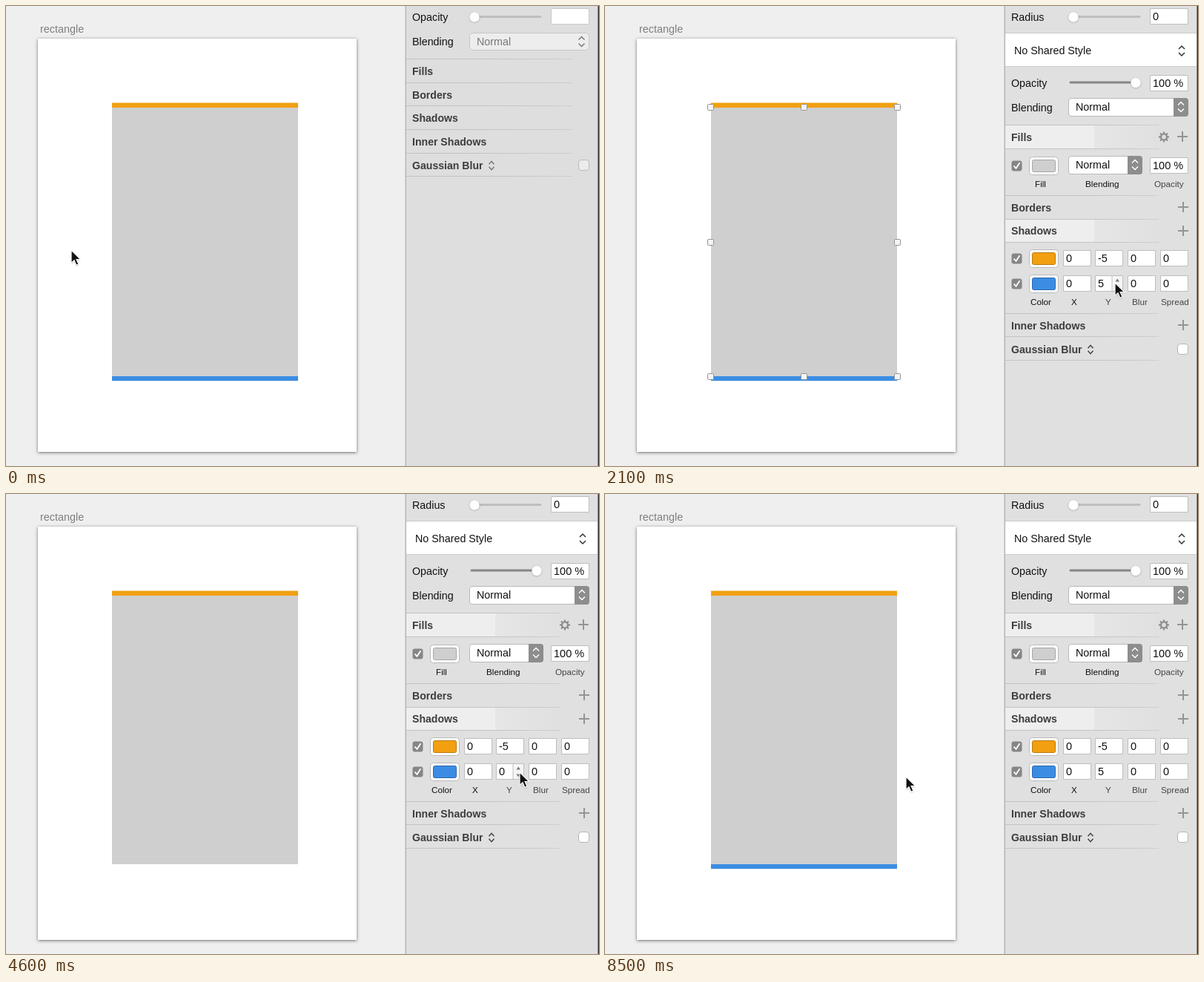
Animation of 800x620 px, one loop 8.6 s. Source, as an HTML page with a canvas:

```html
<!DOCTYPE html>
<html lang="en">
<head>
<meta charset="utf-8">
<title>Shadow inspector</title>
<style>
html, body { margin: 0; width: 100%; height: 100%; overflow: hidden; background: #efefef; }
canvas { display: block; }
</style>
</head>
<body>
<canvas id="stage" width="800" height="620"></canvas>
<script>
const c = document.getElementById('stage').getContext('2d');
const LOOP = 8600, SELECT = 1000;
const ORANGE = '#f2a011', BLUE = '#3b8ce2', GREY = '#cfcfcf';
const REGULAR = '14.3px', BOLD = 'bold 14.1px', SMALL = '11.7px';

// Pointer tip: time, x, y
const path = [
  [0, 88, 329], [100, 88, 329], [900, 287, 308], [1300, 287, 308],
  [2100, 688, 373], [2500, 693, 373], [3200, 693, 373], [4400, 693, 375],
  [5200, 693, 375], [5600, 693, 367], [7800, 693, 367], [8200, 406, 381], [LOOP, 406, 381]
];
const downs = [3200, 3500, 3800, 4000, 4400];
const ups = [5900, 6100, 6300, 6500, 6700];

function pointerAt(t) {
  const i = path.findIndex(k => k[0] > t);
  const [t0, x0, y0] = path[i - 1], [t1, x1, y1] = path[i];
  const u = (t - t0) / (t1 - t0), e = u * u * (3 - 2 * u);
  return [x0 + (x1 - x0) * e, y0 + (y1 - y0) * e];
}

const passed = (list, t) => list.filter(v => v <= t).length;

function text(s, x, y, size = REGULAR, color = '#111') {
  c.font = size + ' "Liberation Sans", Arial, sans-serif';
  c.fillStyle = color;
  c.fillText(s, x, y);
}

function rect(x, y, w, h, color) {
  c.fillStyle = color;
  c.fillRect(x, y, w, h);
}

function box(x, y, w, h, r, fill, stroke) {
  c.beginPath();
  c.roundRect(x + .5, y + .5, w - 1, h - 1, r);
  c.fillStyle = fill;
  c.fill();
  if (stroke) {
    c.strokeStyle = stroke;
    c.lineWidth = 1;
    c.stroke();
  }
}

function line(points, color, width) {
  c.beginPath();
  points.forEach(p => c.lineTo(...p));
  c.strokeStyle = color;
  c.lineWidth = width;
  c.stroke();
}

function fade(x0, x1, from, to) {
  const g = c.createLinearGradient(x0, 0, x1, 0);
  g.addColorStop(0, from);
  g.addColorStop(1, to);
  return g;
}

function arrows(x, y, color, w = 4, gap = 2.5) {
  for (const d of [-1, 1])
    line([[x - w, y + d * gap], [x, y + d * (gap + 4)], [x + w, y + d * gap]], color, 1.5);
}

function slider(y, knob, color) {
  box(626, y - 2, 97, 4, 1.5, color);
  c.save();
  c.shadowColor = 'rgba(0,0,0,.3)';
  c.shadowBlur = 2;
  c.shadowOffsetY = .5;
  c.beginPath();
  c.arc(knob, y + .5, 6.7, 0, 7);
  c.fillStyle = '#fff';
  c.fill();
  c.restore();
}

function field(x, y, w, s) {
  box(x, y, w, 22, 0, '#fff', '#bdbdbd');
  text(s, x + 4, y + 16, '14.5px');
}

function select(x, y, w) {
  box(x, y, w, 25, 3.5, '#fff', '#b9b9b9');
  c.beginPath();
  c.roundRect(x + w - 20, y, 20, 25, [0, 4, 4, 0]);
  c.fillStyle = '#8d8d8d';
  c.fill();
  arrows(x + w - 10, y + 12, '#fff');
  text('Normal', x + 10, y + 17);
}

function check(y) {
  box(548, y - 7, 15, 15, 3, '#868686');
  line([[551.5, y + .5], [554.5, y + 3.8], [559.5, y - 3.8]], '#fff', 1.8);
}

function well(y, color, edge) {
  box(572, y - 12, 40, 25, 4, '#fff', '#b9b9b9');
  box(576, y - 8, 32, 17, 2, color, edge);
}

function plus(x, y) {
  rect(x - 7, y - 1, 14, 2, '#949494');
  rect(x - 1, y - 7, 2, 14, '#949494');
}

function gear(x, y) {
  c.strokeStyle = '#8b8b8b';
  c.lineWidth = 2.2;
  for (let i = 0; i < 8; i++) {
    const a = i * Math.PI / 4;
    c.beginPath();
    c.moveTo(x + 4 * Math.cos(a), y + 4 * Math.sin(a));
    c.lineTo(x + 7 * Math.cos(a), y + 7 * Math.sin(a));
    c.stroke();
  }
  c.beginPath();
  c.arc(x, y, 4, 0, 7);
  c.stroke();
}

const heading = (s, y) => text(s, 548, y, BOLD, '#3d3d3d');
const rule = (y, end) => rect(540, y, end - 540, 1, fade(640, end, '#c2c2c2', '#cecece'));

function artboard(value, handles) {
  text('rectangle', 46, 36, '14.4px', '#7e7e7e');
  c.save();
  c.shadowColor = 'rgba(0,0,0,.55)';
  c.shadowBlur = 4;
  c.shadowOffsetY = 1;
  rect(43, 44, 430, 557, '#fff');
  c.restore();
  rect(143, 130.5, 251, 6.5, ORANGE);
  rect(143, 499, 251, value * 1.24, BLUE);
  rect(143, 137, 251, 362, GREY);
  if (!handles) return;
  for (const x of [138, 264, 390])
    for (const y of [132, 314, 495])
      if (x !== 264 || y !== 314) box(x, y, 9, 9, 1, '#f4f4f4', '#929292');
}

function panelBase(color) {
  rect(539, 0, 261, 620, color);
  rect(538.5, 0, 1.5, 620, '#b5b5b5');
  rect(798.5, 0, 1.5, 620, '#333');
}

function idlePanel() {
  panelBase('#dedede');
  text('Opacity', 548, 20);
  slider(14.5, 632, '#bebebe');
  box(735, 3, 52, 22, 0, '#fff', '#cacaca');
  text('Blending', 548, 53);
  box(625, 36, 162, 24, 4, '#ededed', '#c6c6c6');
  text('Normal', 635, 53, REGULAR, '#777');
  arrows(776.5, 48, '#777');
  ['Fills', 'Borders', 'Shadows', 'Inner Shadows', 'Gaussian Blur'].forEach((s, i) => {
    const y = 71 + Math.round(i * 31.7);
    rule(y, 764);
    heading(s, y + 22);
  });
  rule(229, 764);
  arrows(655, 215, '#777', 3.5, 1.7);
  box(772, 207, 15, 15, 3.5, '#ececec', '#bbb');
}

function highlight(y, h) {
  rect(540, y, 120, h, '#eeeeee');
  rect(660, y, 85, h, fade(660, 745, '#e6e6e6', '#e0e0e0'));
}

function activePanel(value, hover) {
  panelBase('#e0e0e0');
  text('Radius', 548, 20);
  slider(14.5, 632, '#bebebe');
  field(735, 3, 52, '0');

  rect(540, 36, 258, 46, '#cbcbcb');
  rect(540, 37, 258, 44, '#fff');
  text('No Shared Style', 552, 65);
  arrows(778, 60.5, '#333');

  text('Opacity', 548, 109);
  slider(103, 716, '#868686');
  field(735, 93, 52, '100 %');
  text('Blending', 548, 142);
  select(625, 124, 162);

  highlight(161, 31);
  highlight(288, 30);
  for (const y of [160, 192, 255, 287, 318, 414, 445, 477]) rule(y, 747);

  heading('Fills', 182);
  gear(754, 176.5);
  plus(779, 176);
  check(215);
  well(215, GREY, '#a5a5a5');
  select(625, 202, 100);
  field(735, 204, 52, '100 %');
  text('Fill', 580, 244, SMALL);
  text('Blending', 648, 244, SMALL);
  text('Opacity', 741, 244, SMALL, '#444');

  heading('Borders', 277);
  plus(780, 271);
  heading('Shadows', 308);
  plus(780, 303);
  [[340, ORANGE, '#b97a0c', '-5'], [374, BLUE, '#2b68aa', String(value)]].forEach(([y, color, edge, offset]) => {
    check(y);
    well(y, color, edge);
    ['0', offset, '0', '0'].forEach((s, i) => field([618, 661, 705, 749][i], y - 11, 38, s));
  });
  if (hover) stepper();
  text('Color', 574, 403, SMALL);
  text('X', 629, 403, SMALL);
  [['Y', 675], ['Blur', 711], ['Spread', 750]].forEach(([s, x]) => text(s, x, 403, SMALL, '#444'));

  heading('Inner Shadows', 436);
  plus(780, 430);
  heading('Gaussian Blur', 468);
  arrows(655, 463, '#444', 3.5, 1.7);
  box(772, 455, 15, 15, 3.5, '#fff', '#b5b5b5');
}

function stepper() {
  rect(684, 364, 14, 20, '#f5f5f5');
  rect(683.5, 364, 1, 20, '#c2c2c2');
  c.fillStyle = '#777';
  for (const d of [-1, 1]) {
    c.beginPath();
    c.moveTo(688.5, 374.5 + d * 3);
    c.lineTo(691.2, 374.5 + d * 7);
    c.lineTo(694, 374.5 + d * 3);
    c.fill();
  }
}

function pointer(x, y) {
  c.save();
  c.translate(x, y);
  c.beginPath();
  [[0, 0], [0, 17.5], [4, 13.8], [6.9, 20.4], [10, 19], [7.1, 12.6], [12.4, 12.4]]
    .forEach(p => c.lineTo(...p));
  c.closePath();
  c.shadowColor = 'rgba(0,0,0,.35)';
  c.shadowBlur = 2;
  c.shadowOffsetY = 1;
  c.fillStyle = '#111';
  c.fill();
  c.shadowColor = 'transparent';
  c.strokeStyle = '#fff';
  c.lineWidth = 1.2;
  c.stroke();
  c.restore();
}

function draw(now) {
  const t = Math.floor(Math.max(0, now) % LOOP / 100) * 100;
  const value = 5 - passed(downs, t) + passed(ups, t);
  const [x, y] = pointerAt(t);
  rect(0, 0, 800, 620, '#efefef');
  artboard(value, t >= SELECT && t < downs[0]);
  if (t < SELECT) idlePanel();
  else activePanel(value, x > 660 && x < 700);
  pointer(x, y);
}

const start = performance.now();
function tick() {
  draw(performance.now() - start);
  requestAnimationFrame(tick);
}
tick();
</script>
</body>
</html>
```
